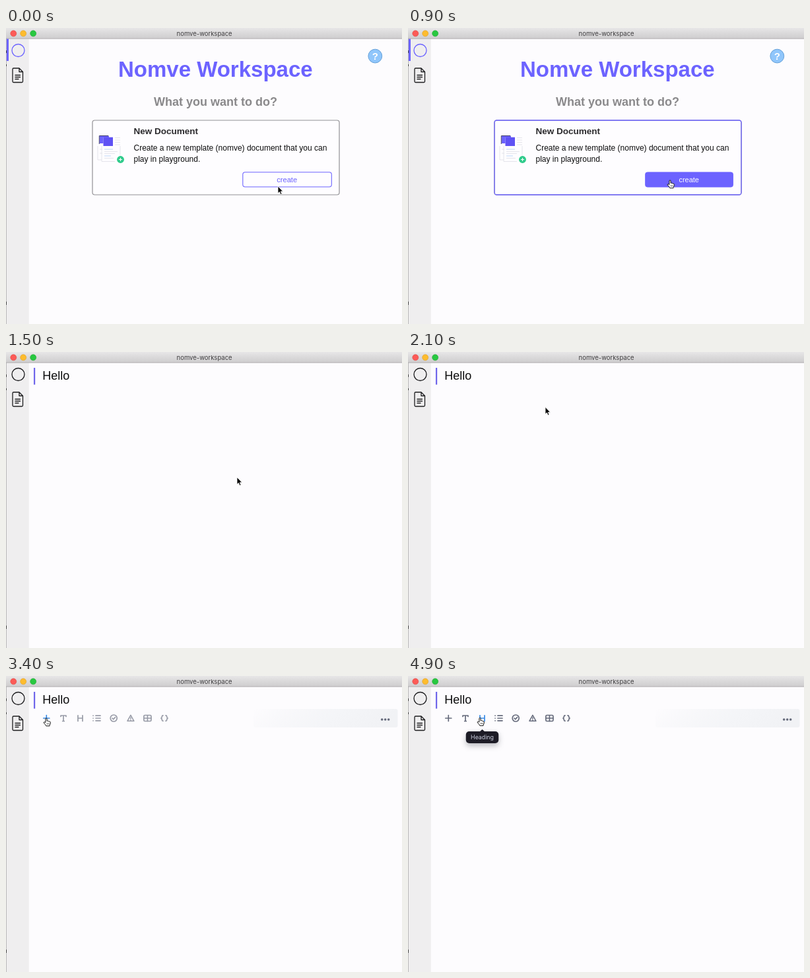
Recreate the animation shown at these times as an HTML page. Size 600x449 px, loop 5 s.

```html
<!DOCTYPE html>
<html lang="en">
<head>
<meta charset="utf-8">
<title>Workspace</title>
<style>
  html, body { margin: 0; width: 100%; height: 100%; overflow: hidden; background: #fdfcfe; }
  svg { display: block; width: 100vw; height: 100vh; }
  text { font-family: "Liberation Sans", Arial, sans-serif; }
  .ui { font-family: Inter, Roboto, sans-serif; }
  .mid { text-anchor: middle; }
  .bold { font-weight: bold; }
  .line { fill: none; stroke-width: 1.7; stroke-linecap: round; stroke-linejoin: round; }
  #tip { filter: drop-shadow(0 4px 4px rgba(13, 20, 33, .28)); }
</style>
</head>
<body>
<svg viewBox="0 0 600 449">
  <defs>
    <linearGradient id="bar" x2="0" y2="1">
      <stop stop-color="#e7e6e7"/><stop offset="1" stop-color="#cecdce"/>
    </linearGradient>
    <linearGradient id="row" x2="1" y2=".15">
      <stop stop-color="#f1f2f5" stop-opacity="0"/><stop offset=".6" stop-color="#f4f5f8"/><stop offset="1" stop-color="#f1f2f5"/>
    </linearGradient>
  </defs>

  <!-- window -->
  <rect width="600" height="449" fill="#fdfcfe"/>
  <rect y="16" width="34.8" height="433" fill="#efeeef"/>
  <rect y="16" width="1" height="433" fill="#b9b8ba"/>
  <path d="M0 34v4M0 55v3M0 415v5" stroke="#444" stroke-width="2"/>
  <rect width="600" height="16" fill="url(#bar)"/>
  <rect y="15.6" width="600" height="1" fill="#aeadaf"/>
  <g stroke-width=".6">
    <circle cx="11.3" cy="8.3" r="4.5" fill="#fc5b57" stroke="#df4744"/>
    <circle cx="26.2" cy="8.3" r="4.5" fill="#fdbc2e" stroke="#dea02c"/>
    <circle cx="41.2" cy="8.3" r="4.5" fill="#28c840" stroke="#22a934"/>
  </g>
  <text class="ui mid" x="300.6" y="11.8" font-size="9.5" fill="#403f41">nomve-workspace</text>

  <!-- sidebar -->
  <rect id="mark" x="1" y="16.5" width="3" height="33.5" fill="#6c63ff"/>
  <circle id="logo" cx="18.5" cy="34" r="9.5" fill="none" stroke-width="1.3"/>
  <path d="M11.5 61H20l5.5 5.500V81q0 1.500-1.500 1.500H11.500q-1.500 0-1.500-1.500V62.500q0-1.500 1.500-1.500zM20 61v5.500h5.500M14 71.500h7.500M14 74.500h7.500M14 77.500h5" class="line" style="stroke-width:1.3" stroke="#1c1c1e"/>

  <!-- home page -->
  <g id="home">
    <text class="mid bold" x="317.3" y="73.500" font-size="33" fill="#6c63ff">Nomve Workspace</text>
    <text class="mid bold" x="317.5" y="118" font-size="18" fill="#8a898b">What you want to do?</text>
    <circle cx="559.3" cy="42.600" r="10.400" fill="#90c6fb" stroke="#639fd8"/>
    <text class="mid bold" x="559.3" y="48" font-size="15" fill="#fff">?</text>

    <rect x="131" y="140" width="374" height="113" rx="3.500" fill="#fefdff" stroke="#929195" stroke-width="1.200"/>
    <rect id="edge" x="131" y="140" width="374" height="113" rx="3.500" fill="none" stroke="#6c63ff" stroke-width="1.300"/>

    <g fill="none" stroke="#dfdfe6" stroke-width=".8">
      <path d="M165 166.500h8M165 170h8M165 173.500h8M165 177h8M139 179v21h6M145 179v23.500h20M173 179v14"/>
      <path d="M149 184h13M149 194h10" stroke="#aecdf5"/>
      <path d="M149 187.500h20M149 190.500h16M149 197.500h14M142 184h4M142 190h4"/>
    </g>
    <path d="M141.300 176v-12.500h14" fill="none" stroke="#3a3768" stroke-width="1"/>
    <path d="M142 164h14v2h-8.500v9H142z" fill="#6c63ff"/>
    <rect x="147.500" y="165.700" width="14.500" height="13.300" fill="#5f52f4"/>
    <circle cx="173.500" cy="199.500" r="5.400" fill="#2fcb8b"/>
    <path d="M171 199.500h5M173.500 197v5" stroke="#fff" stroke-width="1.100"/>

    <text class="bold" x="193.500" y="161" font-size="13.500" fill="#2b2a2d">New Document</text>
    <g font-size="12" fill="#0c0c0d">
      <text x="193.500" y="186">Create a new template (nomve) document that you can</text>
      <text x="193.500" y="202.500">play in playground.</text>
    </g>
    <g id="button" font-size="11.100">
      <rect x="358.800" y="218.800" width="134.500" height="22.200" rx="3.500" fill="#fefdff" stroke="#6c63ff" stroke-width="1.100"/>
      <text class="mid" x="425.700" y="234" fill="#6c63ff">create</text>
      <g id="filled">
        <rect x="358.500" y="218.500" width="135" height="22.800" rx="3.500" fill="#6c63ff"/>
        <text class="mid" x="425.700" y="234" fill="#fff">create</text>
      </g>
    </g>
  </g>

  <!-- editor -->
  <g id="editor">
    <rect x="42" y="24" width="2.200" height="25.500" fill="#6f66ea"/>
    <text x="55.300" y="42" font-size="18" fill="#0b0b0c">Hello</text>
    <g id="tools">
      <rect x="375" y="50" width="218.500" height="28" rx="3" fill="url(#row)"/>
      <g fill="#666b7c">
        <circle cx="569.700" cy="66" r="1.800"/><circle cx="574.700" cy="66" r="1.800"/><circle cx="579.700" cy="66" r="1.800"/>
      </g>
      <path id="plus" class="line" d="M56.800 64h9M61.300 59.500v9"/>
    </g>
    <path id="caret" d="M74.500 57.500v12.500" stroke="#222" stroke-width="1"/>
    <g id="menu" stroke="#666b7c" class="line">
      <path id="iconT" d="M83 61.500v-1.500h8v1.500M87 60v8.500M85.700 68.500h2.600"/>
      <path id="iconH" d="M109 59.800v8.700M116 59.800v8.700M109 64h7"/>
      <path d="M136 60.200h7M136 64h7M136 67.800h7M132 60.200h.1M132 64h.1M132 67.800h.1"/>
      <circle cx="163.200" cy="64" r="5"/><path d="M161 64l1.700 1.700 2.800-3"/>
      <path d="M188.900 59.300l5 9h-10zM188.900 63v2M188.900 66.800v.1" stroke-width="1.500"/>
      <rect x="208.900" y="59.500" width="11" height="9" rx="1.500"/><path d="M209 64h11M214.400 60v8.500"/>
      <path d="M238 59.800q-1.600 0-1.600 1.500 0 2-1.400 2.700 1.400.7 1.400 2.700 0 1.500 1.600 1.500M242 59.800q1.600 0 1.600 1.500 0 2 1.400 2.700-1.400.7-1.400 2.700 0 1.500-1.600 1.500"/>
    </g>
    <g id="tip">
      <path d="M-4.500 85L0 81l4.500 4z" fill="#1d1c26"/>
      <rect id="tipBox" y="84" height="18" rx="5" fill="#1d1c26"/>
      <text id="tipText" class="ui mid" y="96.300" font-size="8.800" fill="#cdd1e0"></text>
    </g>
  </g>

  <!-- pointer shapes, each with its hotspot at 0,0 -->
  <g id="cursor" stroke-linejoin="round">
    <path id="arrow" d="M0 0v10.800l2.400-2.200 1.700 3.900 1.900-.8-1.700-3.800h3.300z" fill="#000" stroke="#fff" stroke-width=".8"/>
    <g id="hand">
      <path d="M-1.100 6.500V1.100a1.100 1.100 0 0 1 2.200 0V4.200q1.700-.7 2 .5 1.600-.5 1.800.6 1.500-.2 1.500 1.300 0 2.500-1.300 4v1.200H-.2q-.8-2-3.400-4.500-.8-1.700 1-1.500z" fill="#fff" stroke="#111" stroke-width="1"/>
      <path d="M1.100 7.500v2M2.700 7.500v2M4.200 7.500v2" stroke="#333" stroke-width=".7"/>
    </g>
    <path id="beam" d="M-2.200-6q2.200 0 2.200 1.500Q0-6 2.200-6M0-4.500v9M-2.200 6q2.200 0 2.200-1.500Q0 6 2.200 6M-1.200 1h2.400" fill="none" stroke="#222" stroke-width="1"/>
  </g>
</svg>
<script>
const LOOP = 5000, STEP = 100;
const GREY = '#666b7c', BLUE = '#388ae5', PURPLE = '#6c63ff';
const $ = id => document.getElementById(id);
const set = (id, name, value) => $(id).setAttribute(name, value);
const fade = (id, value) => set(id, 'opacity', value);
const between = (t, a, b) => t >= a && t < b;

// Linear interpolation through [time, value] pairs
function track(t, keys) {
  const i = keys.findIndex(k => k[0] > t);
  if (i < 0) return keys[keys.length - 1][1];
  if (!i) return keys[0][1];
  const [t0, a] = keys[i - 1], [t1, b] = keys[i];
  return a + (b - a) * (t - t0) / (t1 - t0);
}

const path = [
  [0, 412, 240], [200, 408, 236], [600, 397, 231], [1300, 397, 231],
  [1500, 350, 190], [1700, 258, 115], [1900, 211, 87], [2100, 208, 83.5],
  [2300, 172, 72], [2500, 138, 67], [2600, 136, 66.5], [2900, 136, 66.5],
  [3200, 66, 65], [3400, 61, 64], [3700, 61, 64],
  [4000, 78, 65], [4100, 80.5, 65], [4300, 84, 64], [4600, 84, 64],
  [4800, 104, 63.5], [4900, 109, 63.5]
];
const xKeys = path.map(([t, x]) => [t, x]);
const yKeys = path.map(([t, , y]) => [t, y]);

function pointerAt(t) {
  if (between(t, 200, 1400) || t >= 3200) return 'hand';
  return between(t, 2300, 3000) ? 'beam' : 'arrow';
}

function showTip(label, x, width, opacity) {
  set('tip', 'transform', `translate(${x} 0)`);
  set('tipBox', 'x', -width / 2);
  set('tipBox', 'width', width);
  $('tipText').textContent = label;
  fade('tip', opacity);
}

function draw(t) {
  const hover = track(t, [[0, 0], [400, 1]]);
  const press = track(t, [[700, 1], [900, .985], [1000, 1]]);
  const onHome = t < 1000;

  fade('home', track(t, [[900, 1], [1000, .6], [1100, .12], [1200, 0]]));
  fade('edge', hover);
  fade('filled', hover);
  set('button', 'transform', `translate(425.9 229.9) scale(${press}) translate(-425.9 -229.9)`);
  fade('mark', +onHome);
  set('logo', 'stroke', onHome ? PURPLE : '#1c1c1e');

  fade('editor', +(t >= 1200));
  fade('tools', track(t, [[2200, 0], [2500, 1]]));
  fade('caret', +between(t, 2600, 3300));
  fade('menu', track(t, [[3200, 0], [3500, 1]]));
  set('plus', 'stroke', between(t, 3200, 3800) ? BLUE : GREY);
  set('iconT', 'stroke', between(t, 4000, 4800) ? BLUE : GREY);
  set('iconH', 'stroke', t >= 4800 ? BLUE : GREY);

  if (t < 4800) showTip('Text', 87, 31.5, track(t, [[3900, 0], [4100, .55], [4300, 1]]));
  else showTip('Heading', 112.5, 49.5, 1);

  const pointer = pointerAt(t);
  for (const id of ['arrow', 'hand', 'beam']) fade(id, +(id === pointer));
  set('cursor', 'transform', `translate(${track(t, xKeys)} ${track(t, yKeys)})`);
}

const start = performance.now();
function tick() {
  const t = (performance.now() - start) % LOOP;
  draw(Math.floor(t / STEP) * STEP);
  requestAnimationFrame(tick);
}
tick();
</script>
</body>
</html>
```
